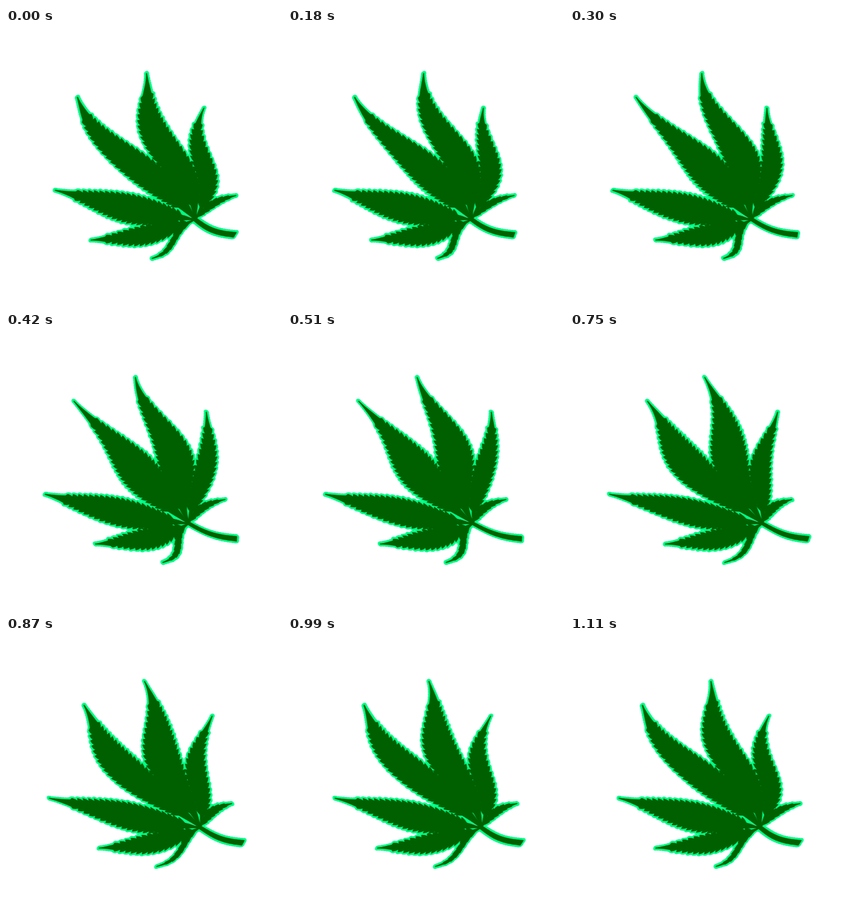
Write an HTML page with a canvas that moves like this. It is 480 px wide and 480 px high and loops after 1140 ms.

```html
<!DOCTYPE html>
<html lang="en">
<head>
<meta charset="utf-8">
<title>Waving leaf</title>
<style>
html, body { margin: 0; width: 100%; height: 100%; overflow: hidden; background: #fff; }
canvas { display: block; width: 480px; height: 480px; }
</style>
</head>
<body>
<canvas id="stage" width="480" height="480"></canvas>
<script>
const SIZE = 480, LOOP = 1140, STEP = 30;
const DARK = '#006000', GLOW = '#00ff87';
const HUB = { x: 327, y: 333 };
const TOOTH = 9.5;

// Blades fan out from the hub: direction in degrees, length, half width,
// sideways bow of the midrib and S-shaped hook of its tip.
const blades = [
  { angle: -109.9, length: 270, half: 27, bow: -2, hook: -3 },
  { angle: -133.5, length: 293, half: 26, bow: -11, hook: -3 },
  { angle: -168.6, length: 257, half: 22, bow: -4.5, hook: 1 },
  { angle: 168.2, length: 175, half: 15.5, bow: -10, hook: 1 },
  { angle: 132.6, length: 92, half: 4.5, bow: -4, hook: -6 },
  { angle: -83.1, length: 195, half: 16.5, bow: 2, hook: -4 },
  { angle: -33.7, length: 75, half: 5.5, bow: -9, hook: 0 }
];
const stem = { angle: 19.2, length: 81, half: 4, bow: 6, hook: 0, plain: true };

// u runs from 0 at the tip to 1 at the hub.
const halfWidth = (b, u) => b.plain
  ? b.half - 1.5 * u
  : b.half * Math.max(0, Math.sin(Math.PI * u ** 1.17)) ** 1.2;

// Point beside the midrib: side is -1 or 1, out is extra distance outwards.
function pointOn(b, u, side, out) {
  const a = b.angle * Math.PI / 180, c = Math.cos(a), s = Math.sin(a);
  const along = (1 - u) * b.length;
  const off = b.bow * Math.sin(Math.PI * u) + b.hook * Math.sin(2 * Math.PI * u)
    + side * (halfWidth(b, u) + out);
  return [HUB.x + c * along - s * off, HUB.y + s * along + c * off];
}

function edge(b, side) {
  const pts = [], step = TOOTH / b.length;
  const from = b.plain ? 1 : .15, to = .86;
  const amp = Math.min(2.6, b.half * .2);
  for (let u = 0; u < from; u += .02) pts.push(pointOn(b, u, side, 0));
  for (let u = from; u < to; u += step) {
    // saw tooth leaning towards the tip
    pts.push(pointOn(b, u, side, amp));
    pts.push(pointOn(b, u + step * .55, side, amp * .3));
    pts.push(pointOn(b, u + step * 1.1, side, -amp));
  }
  pts.push(pointOn(b, 1, side, 0));
  return pts;
}

function outline(b) {
  const path = new Path2D();
  [...edge(b, -1), ...edge(b, 1).reverse()].forEach(p => path.lineTo(...p));
  path.closePath();
  return path;
}

function drawLeaf(g) {
  const shapes = [...blades, stem].map(outline);
  g.lineJoin = g.lineCap = 'round';

  // glow with a slightly scalloped rim
  g.strokeStyle = GLOW;
  for (const [width, dash] of [[7.6, []], [9, [0, 4.5]]]) {
    g.lineWidth = width;
    g.setLineDash(dash);
    shapes.forEach(s => g.stroke(s));
  }
  g.setLineDash([]);

  g.fillStyle = g.strokeStyle = DARK;
  g.lineWidth = 2;
  shapes.forEach(s => { g.fill(s); g.stroke(s); });

  // thin slit next to the hub
  g.strokeStyle = '#58b878';
  g.lineWidth = 1;
  g.beginPath();
  g.moveTo(HUB.x - 21, HUB.y - 8);
  g.lineTo(HUB.x - 8, HUB.y - 3);
  g.stroke();
}

const sheet = document.createElement('canvas');
sheet.width = sheet.height = SIZE;
drawLeaf(sheet.getContext('2d'));

const ctx = document.getElementById('stage').getContext('2d');

// Sideways wave that travels up the rows.
const wave = (y, t) => 10.6 * Math.cos(2 * Math.PI * ((t - 1050) / LOOP + (y - 78) / 223));

function draw(now) {
  const t = Math.floor(now % LOOP / STEP) * STEP;
  ctx.fillStyle = '#fff';
  ctx.fillRect(0, 0, SIZE, SIZE);
  for (let y = 0; y < SIZE; y++) {
    ctx.drawImage(sheet, 0, y, SIZE, 1, wave(y, t), y, SIZE, 1);
  }
}

const start = performance.now();
function tick() {
  draw(performance.now() - start);
  requestAnimationFrame(tick);
}
tick();
</script>
</body>
</html>
```
